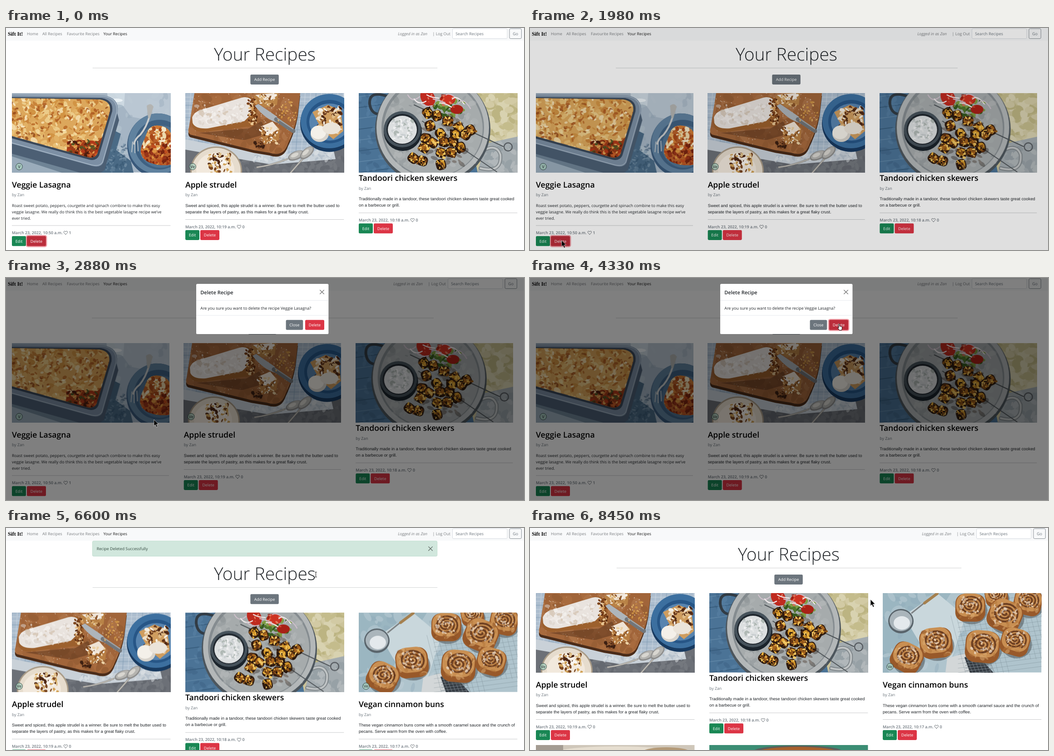
These frames come from a looping animation (1141 by 491 pixels, 8910 ms). An HTML page:

```html
<!DOCTYPE html>
<html lang="en">
<head>
<meta charset="utf-8">
<title>Your Recipes</title>
<style>
html,body{margin:0;width:100%;height:100%;overflow:hidden;background:#fff}
svg{display:block}
#stage{width:100vw;height:100vh}
text{font:8.8px "Open Sans","Noto Sans",sans-serif;fill:#212529;text-rendering:geometricPrecision;white-space:pre}
.mid{text-anchor:middle}
.w{fill:#fff}
.mute{fill:#6c757d}
.date{font-weight:600;fill:#6c757d}
.body{font-size:8.87px}
.arial{font:9.35px "Liberation Sans",Arial,sans-serif}
.h1{font-size:38.9px;font-weight:300;text-anchor:middle}
.h2{font-size:17.6px;font-weight:600;fill:#000}
.h5{font-size:11px;font-weight:600}
.brand{font:bold 11.8px "Liberation Serif",serif;fill:#000}
.it{font-style:italic}
</style>
</head>
<body>
<svg id="stage" viewBox="0 0 1141 491" preserveAspectRatio="none"></svg>
<script>
const H = 175.5, FULL = 349.4, SHIFT = 43.3, LOOP = 8910;

// ---------- drawing helpers ----------
const txt = (x, y, s, cls = '', more = '') => `<text x="${x}" y="${y}" class="${cls}" ${more}>${s}</text>`;
const rect = (x, y, w, h, fill, more = '') => `<rect x="${x}" y="${y}" width="${w}" height="${h}" fill="${fill}" ${more}/>`;
const oval = (x, y, rx, ry, fill, more = '') => `<ellipse cx="${x}" cy="${y}" rx="${rx}" ry="${ry}" fill="${fill}" ${more}/>`;
const tilted = (x, y, rx, ry, a, fill) => oval(x, y, rx, ry, fill, `transform="rotate(${a} ${x} ${y})"`);
const shape = (d, fill, more = '') => `<path d="${d}" fill="${fill}" ${more}/>`;
const line = (d, color, w, more = '') => `<path d="${d}" fill="none" stroke="${color}" stroke-width="${w}" stroke-linecap="round" ${more}/>`;
const button = (x, y, w, label, fill) =>
  rect(x, y, w, 22, fill, 'rx="2.4"') + txt(x + w / 2, y + 14.4, label, 'mid w');
const ring = (x, y, w) =>
  rect(x, y, w, 22, '#bb2d3b', 'rx="2.4"') +
  rect(x - 1.2, y - 1.2, w + 2.4, 24.4, 'none', 'rx="3.4" stroke="#e15361" stroke-opacity=".55" stroke-width="2.4"') +
  txt(x + w / 2, y + 14.4, 'Delete', 'mid w');
const cross = (x, y) => line(`M${x - 4.3} ${y - 4.3}l8.6 8.6m0 -8.6l-8.6 8.6`, '#000', 1.3, 'opacity=".55"');

function random(seed) {
  return () => {
    seed = seed + 0x6D2B79F5 | 0;
    let r = Math.imul(seed ^ seed >>> 15, 1 | seed);
    r = r + Math.imul(r ^ r >>> 7, 61 | r) ^ r;
    return ((r ^ r >>> 14) >>> 0) / 4294967296;
  };
}

function blobs(seed, n, colors, x, y, w, h, size, more = '') {
  const rnd = random(seed);
  let out = '';
  for (let i = 0; i < n; i++) {
    const px = +(x + rnd() * w).toFixed(1), py = +(y + rnd() * h).toFixed(1), r = size * (.4 + rnd() * .6);
    out += tilted(px, py, r.toFixed(1), (r * (.35 + rnd() * .4)).toFixed(1), rnd() * 180 - 90 | 0, colors[rnd() * colors.length | 0]);
  }
  return `<g ${more}>${out}</g>`;
}
const clip = (id, d) => `<clipPath id="${id}"><path d="${d}"/></clipPath>`;
const clipped = (id, s) => `<g clip-path="url(#${id})">${s}</g>`;

// ---------- food pictures, 349.4 x 175.5 ----------
function lasagna() {
  const lump = 'M300 82Q310 68 328 73Q350 76 352 100V158Q322 163 300 152Q278 140 286 116Z';
  return rect(0, 0, FULL, H, '#a5b5c4') +
    shape('M225 0H350V70L262 52Z', '#bac7d3') +
    shape('M0 134L140 176H0Z', '#9aacbb') +
    shape('M0 120L150 166L190 176H110L0 140Z', '#6f8496') +
    blobs(4, 60, ['#c0cdd8', '#93a6b7'], 215, 0, 135, 175, 11, 'opacity=".35"') +
    shape('M196 176L228 84L240 90L230 126L262 150L268 176Z', '#4a6a85') +
    blobs(8, 70, ['#34536e', '#6f8ca3', '#8aa3b6'], 204, 112, 52, 62, 5, 'opacity=".5"') +
    shape('M210 0L213 28Q230 38 247 28L249 0Z', '#d0dce4', 'opacity=".85"') +
    oval(230, 16, 14, 4, '#eaf1f5') + oval(230, 29, 15, 4, '#9fb2c0', 'opacity=".7"') +
    shape('M0 106L178 158L232 44L236 60L204 170L196 176H150L0 134Z', '#4c5f74') +
    shape('M0 2L202 5Q237 10 233 42L201 154Q195 166 176 161L0 112Z', '#7c8fa4') +
    line('M0 4L202 7Q234 12 231 42L200 152Q194 163 176 159L0 110', '#a7b7c6', 1.5) +
    shape('M0 9L198 11Q224 16 221 40L192 138Q186 151 170 147L0 100Z', '#3a485a') +
    clip('pan', 'M0 11L194 14Q219 18 216 40L188 134Q182 145 168 142L0 95Z') +
    clipped('pan', rect(0, 0, 225, 150, '#dca75c') +
      blobs(12, 300, ['#f1d595', '#e4b468', '#d0903f', '#f7e4b7', '#c57c34', '#ecc67c'], 0, 8, 225, 138, 9, 'opacity=".8"') +
      blobs(31, 130, ['#8f4317', '#b5601f', '#a8521c'], 0, 12, 218, 92, 5, 'opacity=".75"') +
      blobs(33, 60, ['#fdf0cf', '#f6dfa4'], 0, 12, 210, 120, 5, 'opacity=".8"') +
      shape('M122 116L146 103L190 106L208 88L190 148L120 134Z', '#9c3d19') +
      blobs(21, 90, ['#c95f28', '#6d2410', '#e0a052', '#545726', '#b43a1a', '#4a1d0e'], 122, 104, 70, 38, 5.5)) +
    oval(322, 116, 68, 71, '#38587a') + oval(322, 112, 66, 67, '#60829f') +
    oval(325, 114, 55, 55, '#3f6182') + oval(327, 118, 48, 47, '#507392') +
    line('M303 52Q296 76 283 92Q272 100 269 112', '#c9cccd', 4) +
    shape('M297 28Q306 20 312 30L304 56L300 55Z', '#b3b4b2') +
    line('M266 108L264 130M271 110L271 132M277 106L278 128', '#c4cacd', 1.8) +
    clip('lump', lump) + shape(lump, '#b9602a') +
    clipped('lump', blobs(17, 110, ['#eed9ab', '#e3a85c', '#a84819', '#f5e8c8', '#cf7a34'], 284, 70, 70, 56, 7.5) +
      blobs(19, 90, ['#7a2510', '#bf4b1d', '#dd9441', '#97351a'], 284, 116, 70, 44, 6));
}

function strudel() {
  const board = 'M20 0H253L249 34Q246 70 226 112Q216 142 186 132L150 126L12 92Q4 88 8 76Z';
  let cloth = '';
  for (let i = 0; i < 30; i++) cloth += line(`M${i * 12} 0l-9 140M0 ${i * 9}h349`, i % 3 ? '#d3dde6' : '#7894b0', 2.5, 'opacity=".35"');
  const spoon = (handle, x, y, a) => line(handle, '#8f8d89', 4) + line(handle, '#cfccc5', 1.5) +
    tilted(x, y, 19, 9.5, a, '#8d8d8c') + tilted(x, y - 1, 16, 7.5, a, '#b5b4b0') + tilted(x - 3, y - 1, 9, 4, a, '#d8d6d0');
  return rect(0, 0, FULL, H, '#acbdce') + cloth +
    shape('M0 118L200 150L350 120V176H0Z', '#6c7077') +
    blobs(3, 90, ['#5d6168', '#80848a'], 110, 134, 240, 42, 10, 'opacity=".4"') +
    shape('M0 102L80 118L200 136L326 124L331 146L190 158L0 125Z', '#c9d1d8') +
    blobs(2, 50, ['#e3e7ea', '#a6b5c3'], 150, 130, 178, 20, 7, 'opacity=".5"') +
    shape(board, '#4b2c19', 'transform="translate(0 6)"') + shape(board, '#a1653a') +
    clip('board', board) +
    clipped('board', blobs(5, 90, ['#b87b4c', '#84502d', '#c59166'], 0, 0, 250, 140, 20, 'opacity=".3"') +
      blobs(6, 200, ['#eadccd'], 10, 0, 230, 115, 1.8, 'opacity=".6"') +
      shape('M30 88L140 78L168 62L180 90L130 104Z', '#5f371e', 'opacity=".55"')) +
    shape('M14 58Q16 42 34 37L126 9Q152 4 156 22L160 58Q158 74 138 74L40 86Q18 86 14 70Z', '#9c602d') +
    shape('M15 54Q20 40 38 36L124 10Q143 6 148 20L146 46L130 62L50 78Q22 80 16 66Z', '#e9e3de') +
    blobs(7, 110, ['#fbf9f7', '#d9d0c8', '#ccb8a2', '#f5f1ee'], 24, 26, 108, 42, 6, 'opacity=".55"') +
    blobs(9, 50, ['#7b421b', '#d19858', '#5a2d14', '#e7c492'], 136, 14, 20, 54, 5) +
    shape('M150 6L176 0H205L202 26L176 32L160 22Z', '#b98347') +
    shape('M154 4L196 0L198 13L170 16Z', '#eee4d8') +
    blobs(18, 26, ['#f5ede3', '#8a5429', '#d8ae72'], 156, 2, 44, 26, 5) +
    shape('M153 28L161 24L202 52L204 66Q176 58 153 28Z', '#aeb5bb') +
    line('M200 58L238 84', '#72767a', 9) + line('M203 56L237 79', '#a1a5a7', 2.5) +
    shape('M164 76L190 64L208 78L206 104L172 114Z', '#b87e42') +
    shape('M166 74L192 63L206 80L182 92Z', '#efe3d4') +
    blobs(10, 44, ['#4d2614', '#ecd0a4', '#885024', '#f6eee3'], 164, 74, 42, 38, 4.5) +
    blobs(20, 16, ['#3d2012', '#6a3a1d'], 148, 106, 26, 14, 5) +
    blobs(14, 26, ['#cb9145', '#e0b267'], 205, 20, 40, 45, 3.5) +
    oval(317, 67, 64, 63, '#183a60') + oval(317, 62, 63, 60, '#3c6f9f') + oval(318, 63, 51, 48, '#275687') + oval(318, 64, 45, 41, '#5884af') +
    shape('M280 42L314 26L342 38L348 84L326 102L300 80Z', '#cf9d5f') +
    blobs(15, 70, ['#efdfc7', '#6d3b1d', '#e0bb87', '#f6eee2', '#4e2814'], 290, 32, 54, 56, 6.5) +
    oval(296, 90, 20, 18, '#d9d4cc') + oval(293, 87, 17, 15, '#f4f0e9') + oval(322, 78, 20, 13, '#ebe4da') +
    oval(68, 172, 57, 54, '#a99b87') + oval(68, 172, 54, 51, '#e6dccd') + oval(66, 170, 42, 38, '#f2e9dd') +
    blobs(16, 60, ['#4d2715', '#d1a258', '#faf6f0', '#e0c08a', '#7b4823'], 46, 134, 54, 42, 6) +
    spoon('M158 164Q190 160 224 146', 244, 138, -24) + spoon('M232 176L258 146', 268, 132, -42);
}

function skewers() {
  const rnd = random(40);
  const meat = [152, 44, 172, 50, 196, 62, 220, 76, 235, 92, 157, 72, 180, 90, 207, 108, 188, 108, 224, 120,
    148, 100, 144, 121, 182, 132, 204, 131, 140, 150, 181, 158, 120, 144, 163, 110, 212, 92, 246, 82];
  let planks = '', chunks = '', onion = '';
  for (let i = 0; i < 8; i++) planks += line(`M0 ${i * 24 + 8}L120 ${i * 24 - 8}`, i % 2 ? '#2c4d6b' : '#6b90ae', 1.6, 'opacity=".7"');
  for (let i = 0; i < meat.length; i += 2) {
    chunks += `<g transform="translate(${meat[i]} ${meat[i + 1]}) rotate(${rnd() * 90 | 0})">` +
      rect(-12, -11, 24, 22, '#2f1b0f', 'rx="8"') + rect(-10, -9, 18, 15, i % 3 ? '#a8661f' : '#cf9329', 'rx="7"') +
      blobs(50 + i, 22, ['#24140b', '#e9b13f', '#5f3213', '#8e5519', '#f0c765'], -10, -9, 20, 18, 4) + '</g>';
  }
  for (let i = 0; i < 9; i++) onion += line(`M${108 + i * 14} ${4 + i % 3 * 9}q10 ${18 - i * 4} 26 ${4 + i}`, i % 2 ? '#f1ebec' : '#cdbfca', 2.4);
  return rect(0, 0, FULL, H, '#4b7396') + planks +
    blobs(27, 70, ['#5f88aa', '#3a5f80'], 0, 0, 110, 175, 12, 'opacity=".4"') +
    shape('M225 0H350V176H262Z', '#cbc39a') +
    blobs(22, 110, ['#aea66c', '#e6e1c6', '#bfb67f', '#d9d2ae'], 255, 0, 95, 115, 15, 'opacity=".5"') +
    shape('M278 112L350 96V176H262Z', '#a3abaf') +
    blobs(28, 40, ['#8a969d', '#c2c7c8'], 285, 112, 65, 64, 12, 'opacity=".45"') +
    line('M66 8Q22 -8 24 24Q28 50 52 46', '#323c45', 6) +
    line('M268 166Q316 178 312 136Q304 112 276 126', '#7f868a', 8) + line('M268 166Q316 178 312 136Q304 112 276 126', '#c0c4c5', 4) +
    oval(163, 80, 127, 124, '#4d565d') + oval(163, 76, 124, 121, '#b3b7b8') + oval(163, 76, 113, 110, '#858c90') + oval(164, 78, 109, 106, '#a6abac') +
    blobs(23, 150, ['#c0c3c4', '#8d9497', '#7b8286', '#b4b8b9'], 72, 10, 186, 150, 9, 'opacity=".4"') +
    blobs(24, 60, ['#4f752c', '#7d9d42', '#365a20'], 160, 14, 72, 38, 7) +
    tilted(152, 10, 15, 20, -30, '#bf2a1f') + oval(196, 14, 17, 12, '#cd3322') + oval(216, 36, 14, 10, '#a82116') +
    blobs(29, 24, ['#e5603f', '#8e1c12', '#f0a07c'], 142, 0, 72, 36, 4, 'opacity=".7"') +
    onion +
    line('M122 26L318 118', '#4d5357', 2) + line('M140 62L304 174', '#4d5357', 2) +
    `<circle cx="329" cy="119" r="9" fill="none" stroke="#565b60" stroke-width="2.4"/>` +
    oval(97, 85, 42, 43, '#1b242c') + oval(96, 80, 41, 40, '#46525b') + oval(96, 80, 35, 34, '#20272e') + oval(96, 81, 32, 31, '#dcdfe0') +
    blobs(25, 70, ['#fafafa', '#c3c9cb', '#9ea9a3', '#eceeee'], 74, 58, 44, 44, 5, 'opacity=".7"') +
    blobs(26, 40, ['#20150e', '#3c2718'], 128, 40, 108, 118, 9, 'opacity=".35"') + chunks;
}

function buns() {
  const spots = [250, 4, 25, 193, 30, 33, 320, 18, 31, 270, 48, 37, 117, 108, 36, 220, 116, 38, 292, 106, 32, 54, 141, 34];
  let out = rect(0, 0, FULL, H, '#afc4cd') +
    shape('M0 0H150L40 176H0Z', '#9bb6c1') +
    blobs(60, 80, ['#c3d3d9', '#8eabb8'], 0, 0, 200, 175, 16, 'opacity=".4"') +
    shape('M46 50L120 0L182 52L150 150L86 118Z', '#c9d7dc') +
    shape('M142 144L186 132L194 176H138Z', '#d3d7d8');
  for (let i = 0; i < 18; i++) out += line(`M${150 + i * 12} ${i < 9 ? 50 : 20}l32 126M166 ${16 + i * 10}l184 -24`, '#6c7b84', .9, 'opacity=".4"');
  out += shape('M180 142L204 132L244 176H192Z', '#343b42');
  for (let i = 0; i < 7; i++) out += line(`M${184 + i * 8} 140l14 36M182 ${142 + i * 6}l58 -6`, '#7c868e', .9);
  out += line('M64 44L96 18', '#7d8183', 3) + line('M92 22L120 1', '#a5804f', 6) +
    oval(40, 62, 28, 27, '#59646b') + oval(40, 61, 25, 23, '#aab5bb') + oval(42, 66, 18, 15, '#e4e9ec');
  for (let i = 0; i < spots.length; i += 3) {
    const [x, y, r] = spots.slice(i, i + 3), turn = `transform="rotate(${i * 17 % 40 - 10} ${x} ${y})"`;
    let d = '';
    for (let a = 0; a < 20; a += .3) {
      const q = 2 + a * r * .036;
      d += (a ? 'L' : 'M') + (x + Math.cos(a) * q).toFixed(1) + ' ' + (y - 3 + Math.sin(a) * q * .85).toFixed(1);
    }
    out += oval(x + 3, y + 9, r * 1.05, r * .92, '#4f565a', 'opacity=".55"') +
      rect(x - r, y - r * .85, r * 2, r * 1.85, '#98592a', `rx="${r * .6}" ${turn}`) +
      rect(x - r * .94, y - r * .88, r * 1.86, r * 1.55, '#c98f52', `rx="${r * .65}" ${turn}`) +
      blobs(80 + i, 30, ['#b3763c', '#dcae74', '#8a5025'], x - r * .8, y - r * .7, r * 1.6, r * 1.5, r * .2, 'opacity=".5"') +
      line(d, '#5e331a', r * .11, 'opacity=".85"') +
      blobs(70 + i, 50, ['#efe0cf', '#fbf3e8', '#b0733a'], x - r * .65, y - r * .65, r * 1.3, r * 1.1, r * .12, 'opacity=".6"');
  }
  return out;
}

// ---------- page ----------
const dishes = {
  lasagna: { title: 'Veggie Lasagna', badge: 'V', time: '10:50', likes: 1, font: 'body',
    text: ['Roast sweet potato, peppers, courgette and spinach combine to make this easy', 'veggie lasagne. We really do think this is the best vegetable lasagne recipe we’ve', 'ever tried.'] },
  strudel: { title: 'Apple strudel', badge: 'Ve', time: '10:19', likes: 0, font: 'arial',
    text: ['Sweet and spiced, this apple strudel is a winner. Be sure to melt the butter used', 'separate the layers of pastry, as this makes for a great flaky crust.'] },
  skewers: { title: 'Tandoori chicken skewers', time: '10:18', likes: 0, font: 'arial',
    text: ['Traditionally made in a tandoor, these tandoori chicken skewers taste great cooked', 'on a barbecue or grill.'] },
  buns: { title: 'Vegan cinnamon buns', badge: 'Ve', time: '10:17', likes: 0, font: 'arial',
    text: ['These vegan cinnamon buns come with a smooth caramel sauce and the crunch of', 'pecans. Serve warm from the oven with coffee.'] }
};
dishes.strudel.text[0] += ' to';

function card(name, x, w, focus) {
  const d = dishes[name], up = d.badge ? 0 : -14.7, low = up + (d.text.length - 2) * 13.3;
  let s = `<svg x="${x}" y="144" width="${w}" height="${H}" viewBox="${(FULL - w) / 2} 0 ${w} ${H}"><use href="#${name}"/></svg>`;
  if (d.badge) s += `<circle cx="${x + 16}" cy="306.6" r="7.3" fill="#a8d0bf" fill-opacity=".75" stroke="#2b3f3c" stroke-width=".9"/>` + txt(x + 16, 309.9, d.badge, 'mid');
  s += txt(x, 352.7 + up, d.title, 'h2') + txt(x, 372.3 + up, 'by Zan', 'mute');
  d.text.forEach((t, i) => s += txt(x, 395.6 + up + i * 14.2, t, d.font));
  s += rect(x, 423.2 + low, w, .8, '#bcbec0') +
    txt(x, 442.9 + low, `March 23, 2022, ${d.time} a.m.`, 'date') +
    line(`M${x + 118.4} ${443.2 + low}c-6 -4 -4.4 -7.5 -2 -7.2q1.5 .3 2 1.6q.5 -1.3 2 -1.6c2.4 -.3 4 3.2 -2 7.2z`, '#4d555c', .9) +
    txt(x + 125.6, 442.9 + low, d.likes, 'date') +
    button(x, 447 + low, 31, 'Edit', '#198754') + button(x + 33, 447 + low, 42, 'Delete', '#dc3545');
  return s + (focus ? `<g id="${focus}">${ring(x + 33, 447 + low, 42)}</g>` : '');
}

const links = (W, soft, strong) => {
  const f = c => `style="fill:${c}"`;
  return txt(46, 16.2, 'Home', '', f(soft)) + txt(80, 16.2, 'All Recipes', '', f(soft)) +
    txt(134, 16.2, 'Favourite Recipes', '', f(soft)) + txt(214.5, 16.2, 'Your Recipes', '', f(strong)) +
    txt(W - 277.8, 16.2, 'Logged in as Zan', 'it', f(soft)) + txt(W - 201.5, 16.2, '| Log Out', '', f(soft));
};

const field = (W, border) => rect(W - 157.5, 1.5, 120.5, 22, '#fff', `rx="2.4" stroke="${border}" stroke-width=".8"`) +
  txt(W - 150.8, 16.2, 'Search Recipes', 'mute body');

const navbar = W => rect(0, 0, 1141, 28, '#f8f9fa') + txt(4, 16.8, 'Sift It!', 'brand') +
  links(W, '#7c7f82', '#1a1a1a') + field(W, '#ced4da') +
  rect(W - 32, 1.5, 26.4, 22, 'none', 'rx="2.4" stroke="#6c757d" stroke-width=".8"') + txt(W - 18.8, 16.2, 'Go', 'mid mute');

function content(W, names, focus) {
  const step = (W + 5) / 3, w = step - 32.6, bar = W * .6657;
  return txt(W / 2 - .5, 72, 'Your Recipes', 'h1') +
    rect((W - bar) / 2, 88, bar, .8, '#c6c8c9') +
    button(W / 2 - 32.2, 103, 62.5, 'Add Recipe', '#6c757d') +
    names.map((n, i) => card(n, 13 + i * step, w, i ? '' : focus)).join('');
}

const nextRow = rect(13, 480, 349.4, 20, '#cfc7ba') + oval(190, 496, 130, 13, '#e6ded0') + rect(13, 480, 60, 20, '#a49c92') + oval(300, 494, 50, 9, '#b49a78') +
  rect(395, 480, 349.4, 20, '#3b8d74') + oval(590, 494, 98, 13, '#5b5f5c') + oval(590, 496, 88, 12, '#a8602c');

const flash = rect(41, 1, 230, 23, '#212529') + rect(859, 1, 124.5, 23, '#212529') + links(1141, '#e4e5e6', '#fff') +
  field(1141, '#333') + rect(1109, 1.5, 26.4, 22, '#212529', 'rx="2.4"') + txt(1122.2, 16.2, 'Go', 'mid w') +
  button(538.3, 103 + SHIFT, 62.5, 'Add Recipe', '#212529');

const alertBox = rect(190.4, 28.8, 759.4, 33.6, '#d1e7dd', 'rx="2.4" stroke="#badbcc" stroke-width=".8"') +
  txt(199.7, 49, 'Recipe Deleted Successfully', '', 'style="fill:#33483f"') + cross(935, 45.7);

const modal = rect(419, 13, 291.4, 111, '#fff', 'rx="2.6"') +
  txt(428.3, 35.5, 'Delete Recipe', 'h5') + cross(696, 31) +
  rect(419, 49.4, 291.4, .7, '#dee2e6') + rect(419, 82.4, 291.4, .7, '#dee2e6') +
  txt(428.3, 69.7, 'Are you sure you want to delete the recipe Veggie Lasagna?', 'body') +
  button(616.6, 92.8, 37.6, 'Close', '#6c757d') + button(659, 92.8, 42, 'Delete', '#dc3545') +
  `<g id="hover">${button(659, 92.8, 42, 'Delete', '#bb2d3b')}</g><g id="pressed">${ring(659, 92.8, 42)}</g>`;

const cursors = `<g id="arrow">${shape('M0 0V14.2L3.2 11.3L5.6 17L8 16L5.6 10.3H10Z', '#000', 'stroke="#fff" stroke-width=".6"')}</g>` +
  `<g id="hand">${shape('M-1 1c0 -1.3 2 -1.3 2 0v4.6c.4 -.8 1.8 -.7 2 .2c.5 -.6 1.7 -.4 1.8 .5c.6 -.4 1.6 0 1.6 1v2.8c0 1.5 -1 2.3 -1 3.9h-5.2c-.4 -1.8 -2.2 -3.2 -3.2 -5c-.5 -1 .8 -1.8 1.6 -.8l.4 .7z', '#fff', 'stroke="#000" stroke-width=".9"')}</g>` +
  `<g id="beam">${line('M-1.8 -5.5h1.2l.6 .5l.6 -.5h1.2M0 -5V5M-1.8 5.5h1.2l.6 -.5l.6 .5h1.2', '#000', .9)}</g>`;

const pictures = { lasagna, strudel, skewers, buns };
document.getElementById('stage').innerHTML =
  `<defs><filter id="soft" x="0" y="0" width="1" height="1"><feGaussianBlur stdDeviation=".6"/></filter>` +
  Object.entries(pictures).map(([id, draw]) => `<g id="${id}" filter="url(#soft)">${draw()}</g>`).join('') + '</defs>' +
  rect(0, 0, 1141, 491, '#fff') +
  `<g id="before">${content(1141, ['lasagna', 'strudel', 'skewers'], 'firstFocus')}${navbar(1141)}</g>` +
  `<g id="asking">${content(1131, ['lasagna', 'strudel', 'skewers'], 'focus')}${navbar(1131)}` +
  `${rect(0, 0, 1141, 491, '#000', 'id="shade"')}<g id="modal">${modal}</g></g>` +
  `<g id="after"><g id="list">${content(1141, ['strudel', 'skewers', 'buns'])}${nextRow}</g>${navbar(1141)}` +
  `<g id="alert">${alertBox}</g><g id="flash">${flash}</g></g>` + cursors;

// ---------- motion ----------
const el = id => document.getElementById(id);
const show = (id, on) => el(id).setAttribute('display', on ? 'inline' : 'none');
const fade = (id, v) => el(id).setAttribute('opacity', v);
const move = (id, x, y) => el(id).setAttribute('transform', `translate(${x} ${y})`);
const span = (t, a, b) => Math.min(1, Math.max(0, (t - a) / (b - a)));
const ease = p => p * p * (3 - 2 * p);
const mix = (a, b, p) => a + (b - a) * p;

const beats = [0, 660, 1570, 1980, 2120, 2180, 2530, 3440, 4120, 5250, 6600, 8240];
function snap(t) {
  const b = beats.filter(v => v <= t).pop();
  return b + Math.floor((t - b) / 70) * 70;
}

function pointer(t) {
  if (t < 1570) {
    const p = ease(span(t, 640, 1500)), q = 1 - p;
    return [q * q * 447 + 2 * p * q * 260 + p * p * 82, q * q * 489 + 2 * p * q * 347 + p * p * 465];
  }
  if (t < 2530) {
    const p = ease(span(t, 1500, 1850));
    return [mix(82, 69.5, p), mix(465, 469.5, p)];
  }
  if (t < 3440) {
    const p = ease(span(t, 2460, 3370));
    return [mix(69.5, 649, p), mix(469.5, 116, p)];
  }
  if (t < 5390) {
    const p = ease(span(t, 3370, 3720));
    return [mix(649, 681, p), mix(116, 101.5, p)];
  }
  const p = ease(span(t, 6600, 7300));
  return [mix(682.5, 750, p), mix(103, 158, p)];
}

function render(t) {
  const [x, y] = pointer(t);
  show('before', t < 1980);
  show('asking', t >= 1980 && t < 5250);
  show('after', t >= 5250);

  show('focus', t < 2530);
  fade('shade', .5 * span(t, 1942, 2092));
  fade('modal', span(t, 2085, 2235));
  move('modal', 0, -29.7 * Math.pow(1 - span(t, 2102, 2402), 1.7));
  show('hover', x >= 659);
  show('pressed', t >= 4120);

  fade('flash', 1 - span(t, 5250, 5390));
  fade('alert', 1 - span(t, 8170, 8400));
  show('alert', t < 8450);
  move('list', 0, t < 8450 ? SHIFT : 0);

  const overPage = t < 1980 && x > 46 && x < 88 && y > 460;
  const overModal = t > 3370 && t < 5390 && x > 659;
  const kind = t < 660 ? '' : overPage || overModal ? 'hand' : t >= 5390 && x < 688 ? 'beam' : 'arrow';
  for (const id of ['arrow', 'hand', 'beam']) {
    show(id, id === kind);
    move(id, x, y);
  }
}

const start = performance.now();
let shown = -1;
function tick() {
  const t = snap((performance.now() - start) % LOOP);
  if (t !== shown) render(shown = t);
  requestAnimationFrame(tick);
}
tick();
</script>
</body>
</html>
```
